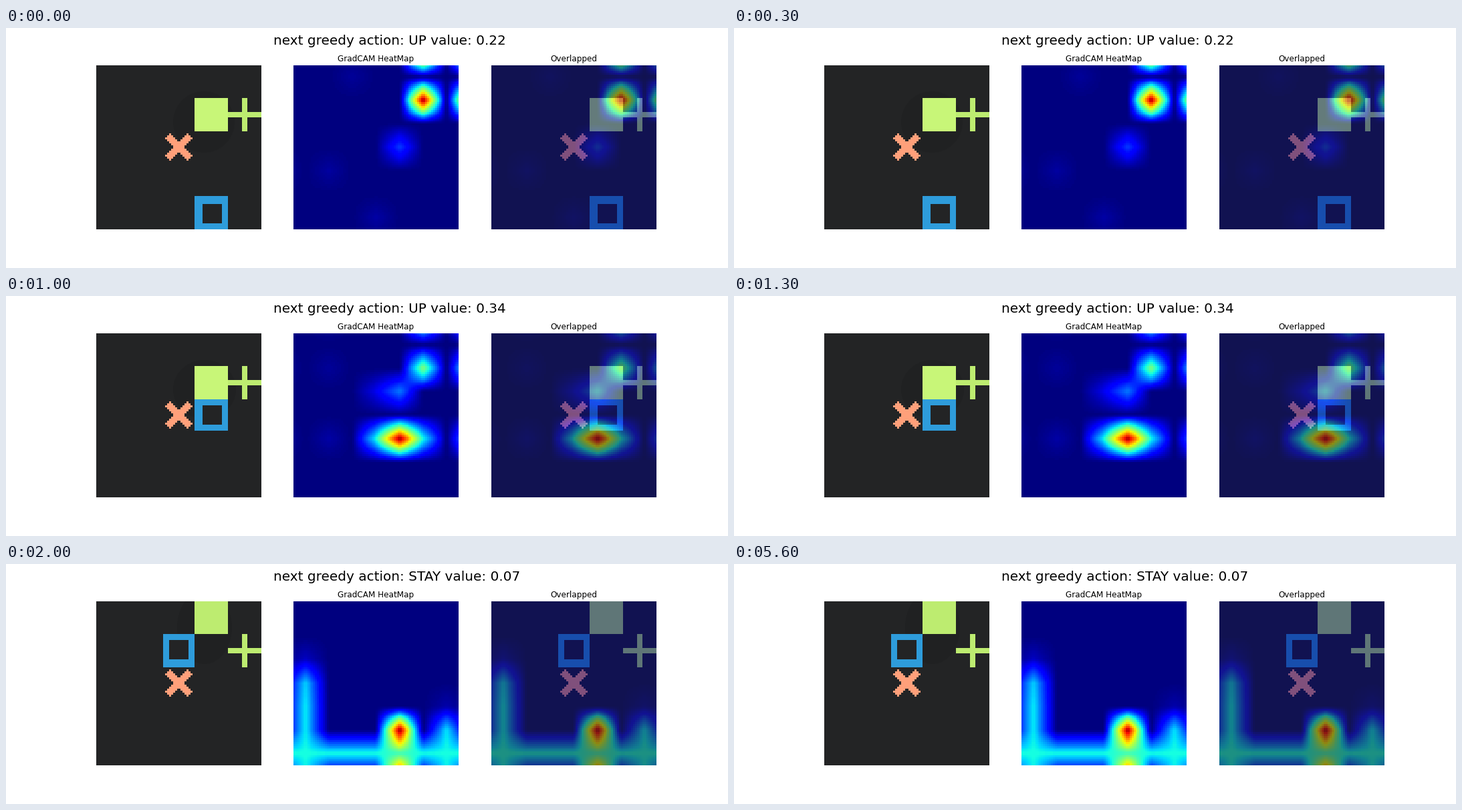
These frames come from a looping animation (1080x360 px, 8000 ms). A matplotlib script:

```python
import matplotlib.pyplot as plt
import numpy as np
from matplotlib.animation import FuncAnimation
from matplotlib.patches import Ellipse
from matplotlib.transforms import IdentityTransform

SIZE, GRID, CELLS = 84, 5, 7
STEP_MS, LOOP_MS = 500, 8000
FLOOR = (35, 36, 37)
SALMON, BLUE = (255, 160, 122), (46, 156, 219)
LIME, BRIGHT_LIME = (189, 236, 112), (200, 246, 120)

plt.rcParams["font.family"] = "DejaVu Sans"

# action, value, agent cell, block row, shade (x, y, w, h), {(row, col): activation}
STEPS = [
    ("UP", 0.22, (3, 4), 1, (296, 141, 92, 92),
     {(1, 5): 1, (3, 4): .19, (0, 2): .025, (4, 1): .03, (6, 3): .035}),
    ("UP", 0.26, (3, 3), 1, (296, 161, 112, 128),
     {(1, 5): 1, (3, 4): .28, (4, 3): .24, (3, 5): .07, (4, 1): .035}),
    ("UP", 0.34, (3, 2), 1, (297, 140, 94, 88),
     {(4, 4): 1, (4, 3): .38, (4, 5): .38, (1, 5): .52, (2, 4): .25,
      (2, 3): .1, (1, 1): .025, (4, 1): .035}),
    ("LEFT", 0.00, (3, 1), 0, (301, 112, 98, 122),
     {(range(6), 0): .38, (3, 0): .35, (0, 1): .36, (6, range(7)): .38,
      (5, 4): 1, (6, 4): .42, (5, 6): .35}),
    ("STAY", 0.07, (2, 1), 0, (297, 95, 82, 110),
     {(range(3, 6), 0): .36, (3, 0): .33, (2, 0): .06,
      (6, range(7)): .38, (5, 4): 1, (6, 4): .42, (5, 6): .35,
      (4, 6): .04}),
]


def edge(k):
    """Pixel boundary of a position given in grid cells."""
    return int(round(k * SIZE / GRID))


def rect(img, x0, y0, x1, y1, color):
    img[edge(y0):edge(y1), edge(x0):edge(x1)] = (*color, 255)


def sprites(agent, block_row):
    img = np.zeros((SIZE, SIZE, 4), np.uint8)
    rect(img, 3, block_row, 4, block_row + 1, BRIGHT_LIME if block_row else LIME)
    rect(img, 4, 1.4, 5, 1.6, LIME)
    rect(img, 4.4, 1, 4.6, 2, LIME)

    i, j = np.mgrid[:14, :14]
    d, s = abs(i - j), abs(i + j - 13)
    cross = ((d <= 2) & (s <= 11)) | ((s <= 2) & (d <= 11))
    img[35:49, 35:49][cross] = (*SALMON, 255)

    x, y = agent
    rect(img, x, y, x + 1, y + 1, BLUE)
    rect(img, x + .2, y + .2, x + .8, y + .8, FLOOR)
    return img


def heatmap(cells):
    """Bilinear upsampling with reflected borders."""
    coarse = np.zeros((CELLS, CELLS))
    for (row, col), v in cells.items():
        coarse[np.array(row), np.array(col)] = v
    last = CELLS - 1
    p = (np.arange(SIZE) + .5) * CELLS / SIZE - .5
    p = last - abs(last - abs(p))
    w = np.clip(1 - abs(p[:, None] - np.arange(CELLS)), 0, 1)
    return w @ coarse @ w.T


STATES = [(f"next greedy action: {a} value: {v:.2f}", sprites(agent, row),
           heatmap(cells), shade)
          for a, v, agent, row, shade, cells in STEPS]

fig, axes = plt.subplots(1, 3, figsize=(15, 5), dpi=72)
fig.subplots_adjust(left=.125, right=.9, bottom=.125, top=.88, wspace=.2)
for ax, name in zip(axes, ("", "GradCAM HeatMap", "Overlapped")):
    ax.axis("off")
    ax.set_title(name, fontsize=12)
head = fig.text(.37, 335 / 360, "", fontsize=20, va="baseline")

floor = np.full((SIZE, SIZE, 3), FLOOR, np.uint8)
empty = np.zeros((SIZE, SIZE, 4), np.uint8)
blank = np.zeros((SIZE, SIZE))
opts = dict(interpolation="nearest")
jet = dict(cmap="jet", vmin=0, vmax=1, **opts)

for ax in (axes[0], axes[2]):
    ax.imshow(floor, zorder=0, **opts)
shade = Ellipse((0, 0), 1, 1, fc=(.125, .13, .133), ec="none", zorder=1,
                transform=IdentityTransform())
axes[0].add_artist(shade)
scene = [ax.imshow(empty, zorder=2, **opts) for ax in (axes[0], axes[2])]
heat = [axes[1].imshow(blank, **jet),
        axes[2].imshow(blank, alpha=.5, zorder=3, **jet)]


def draw(i):
    text, img, act, (x, y, w, h) = STATES[min(i, len(STATES) - 1)]
    head.set_text(text)
    for im in scene:
        im.set_data(img)
    for im in heat:
        im.set_data(act)
    shade.set_center((x, 360 - y))
    shade.set_width(w)
    shade.set_height(h)
    return [head, shade, *scene, *heat]


anim = FuncAnimation(fig, draw, frames=LOOP_MS // STEP_MS, interval=STEP_MS,
                     repeat=True, repeat_delay=0)
plt.show()
```
